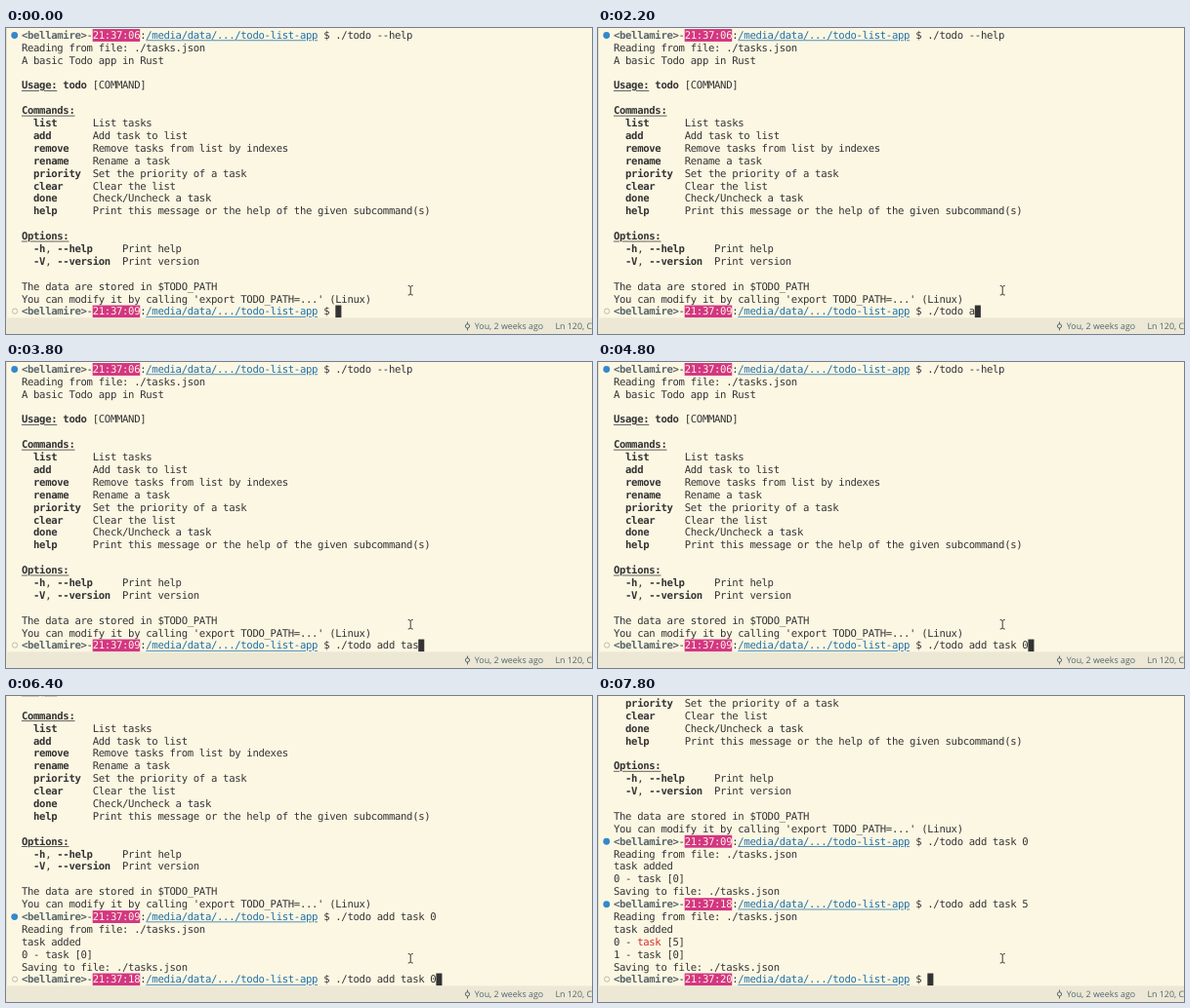
Animation, 600 px wide and 314 px high, one loop 8 s. Source, as an HTML page:

```html
<!DOCTYPE html>
<html lang="en">
<head>
<meta charset="utf-8">
<title>Terminal todo list</title>
<style>
html, body { margin: 0; width: 100%; height: 100%; overflow: hidden; background: #fcf7e3; }
#stage { position: relative; width: 600px; height: 314px; overflow: hidden; }
#app {
  position: absolute; width: 792px; height: 414px;
  transform: translateY(.3px) scale(.758); transform-origin: 0 0;
  white-space: pre; text-rendering: geometricPrecision;
}
#view { position: absolute; left: 0; top: 0; width: 792px; height: 392px; overflow: hidden; box-shadow: inset 1px 0 #ddd6c1; }
#lines {
  position: absolute; left: 21px; top: 1px; color: #333;
  font: 14px/18px "DejaVu Sans Mono", monospace; letter-spacing: calc(8px - 1ch);
}
#lines div { position: relative; height: 17px; }
u { text-underline-offset: 2px; text-decoration-thickness: 1px; }
.user { color: #586569; }
.clock, .cursor { display: inline-block; height: 17px; vertical-align: top; }
.clock { background: #d33682; color: #fdf6e3; }
.cursor { background: #333; }
.path { color: #1f6fa8; }
.hot { color: #d0302d; }
.mark { position: absolute; box-sizing: border-box; border-radius: 50%; }
.done { left: -13.7px; top: 3.7px; width: 9px; height: 9px; background: #3389cc; }
.open { left: -13px; top: 4px; width: 8px; height: 8px; border: 1.3px solid #aeaa9d; }
#status {
  position: absolute; left: 0; top: 392px; width: 792px; height: 23px; background: #ece8d5;
  font: 11.7px/22px "Open Sans", sans-serif; color: #50666d;
}
#status span { position: absolute; }
svg { position: absolute; left: 0; top: 0; fill: none; }
</style>
</head>
<body>
<div id="stage">
  <div id="app">
    <div id="view"><div id="lines"></div></div>
    <div id="status"><span style="left:633px">You, 2 weeks ago</span><span style="left:742px">Ln 120, Col 1</span></div>
  </div>
  <svg width="600" height="314">
    <path d="M411.7 264.5Q414 264.5 414.2 265.6Q414.4 264.5 416.7 264.5M414.2 265.3V273.2M411.7 274Q414 274 414.2 272.9Q414.4 274 416.7 274" stroke="#3a3a3a"/>
    <path d="M472.5 301.6V303.8M472.5 308V310.4" stroke="#50666d"/>
    <circle cx="472.5" cy="305.9" r="2.1" stroke="#50666d"/>
  </svg>
</div>
<script>
const LOOP = 8000, ROWS = 23, ROW_HEIGHT = 17;
const heading = text => `<b><u>${text}</u></b>`;
const command = (name, about) => `  <b>${name}</b>${' '.repeat(10 - name.length)}${about}`;
const prompt = (clock, input, done) =>
  `<i class="mark ${done ? 'done' : 'open'}"></i><b class="user">&lt;bellamire&gt;</b>-` +
  `<span class="clock">${clock}</span>:<u class="path">/media/data/.../todo-list-app</u> $ ` +
  input + (done ? '' : '<span class="cursor"> </span>');

const reading = 'Reading from file: ./tasks.json';
const saving = 'Saving to file: ./tasks.json';
const help = [
  prompt('21:37:06', './todo --help', true),
  reading, 'A basic Todo app in Rust', '',
  heading('Usage:') + ' <b>todo</b> [COMMAND]', '',
  heading('Commands:'),
  command('list', 'List tasks'),
  command('add', 'Add task to list'),
  command('remove', 'Remove tasks from list by indexes'),
  command('rename', 'Rename a task'),
  command('priority', 'Set the priority of a task'),
  command('clear', 'Clear the list'),
  command('done', 'Check/Uncheck a task'),
  command('help', 'Print this message or the help of the given subcommand(s)'), '',
  heading('Options:'),
  '  <b>-h</b>, <b>--help</b>     Print help',
  '  <b>-V</b>, <b>--version</b>  Print version', '',
  'The data are stored in $TODO_PATH',
  "You can modify it by calling 'export TODO_PATH=...' (Linux)"
];
const first = [...help, prompt('21:37:09', './todo add task 0', true),
  reading, 'task added', '0 - task [0]', saving];
const second = [...first, prompt('21:37:18', './todo add task 5', true),
  reading, 'task added', '0 - <span class="hot">task</span> [5]', '1 - task [0]', saving];

const screens = [[0, help, '21:37:09'], [5800, first, '21:37:18'], [7800, second, '21:37:20']];

// Input line: start time, typed text, visible length
const zero = './todo add task 0', five = './todo add task 5';
const typing = [
  [0, zero, 0], [1000, zero, 2], [1600, zero, 3], [1800, zero, 5], [2000, zero, 7],
  [2200, zero, 8], [2600, zero, 9], [2800, zero, 10], [3000, zero, 11], [3400, zero, 12],
  [3600, zero, 13], [3800, zero, 14], [4000, zero, 15], [4200, zero, 16], [4800, zero, 17],
  [5800, zero, 0], [6200, zero, 17], [6800, zero, 16], [7400, five, 17], [7800, five, 0]
];

const at = (steps, time) => steps.findLast(step => step[0] <= time);
const lines = document.getElementById('lines');
let shown = '';

function draw(now) {
  const time = now % LOOP;
  const [, history, clock] = at(screens, time);
  const [, text, length] = at(typing, time);
  const all = [...history, prompt(clock, text.slice(0, length), false)];
  const html = all.map(line => `<div>${line}</div>`).join('');
  if (html !== shown) {
    lines.innerHTML = shown = html;
    lines.style.marginTop = `${(ROWS - all.length) * ROW_HEIGHT}px`;
  }
}

const start = performance.now();
function tick() {
  draw(performance.now() - start);
  requestAnimationFrame(tick);
}
tick();
</script>
</body>
</html>
```
